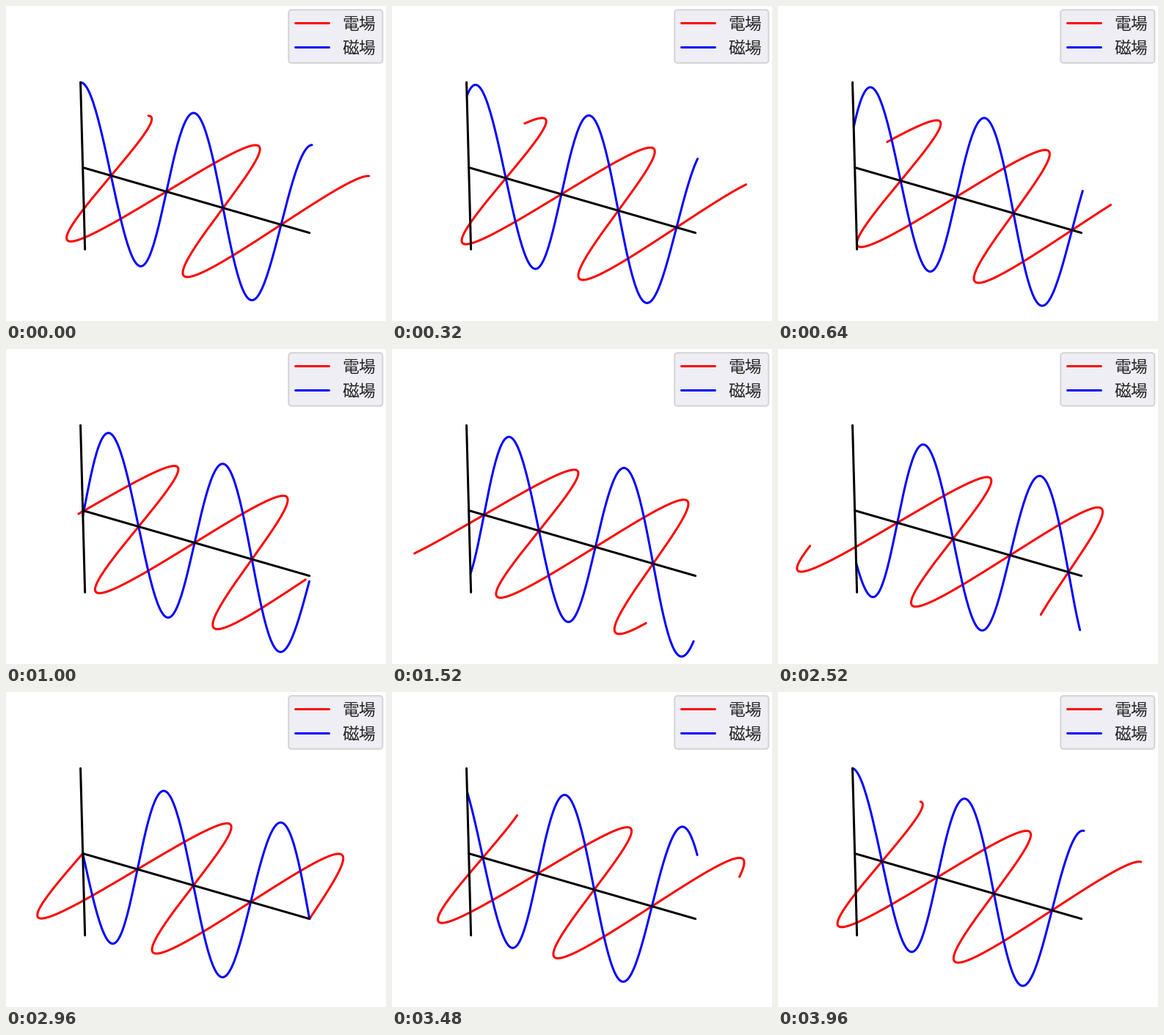
Write a matplotlib script that moves like this. It is 518 by 430 pixels and loops after 4 s.

```python
import numpy as np
import matplotlib.pyplot as plt
from matplotlib.animation import FuncAnimation
from matplotlib.patches import FancyBboxPatch

W, H, DPI = 518, 430, 128
FRAMES, INTERVAL = 100, 40
PX = 72 / DPI                       # points per pixel
LINE = 3.0 * PX
EM = 22.9                           # legend font size in pixels

# Perspective camera: elevation 30, azimuth -60, distance 10
CENTER, SCALE, DIST = (255.5, 264.0), 324.5, 10
HALF = np.array([0.5495, 0.5495, 0.4121])
EL, AZ = np.radians(30), np.radians(-60)
RIGHT = np.array([-np.sin(AZ), np.cos(AZ), 0])
UP = np.array([-np.sin(EL) * np.cos(AZ), -np.sin(EL) * np.sin(AZ), np.cos(EL)])
EYE = np.array([np.cos(EL) * np.cos(AZ), np.cos(EL) * np.sin(AZ), np.sin(EL)])


def project(x, y, z):
    """Map box coordinates in -1..1 to pixels, y pointing down."""
    p = np.stack(np.broadcast_arrays(x, y, z), axis=-1) * HALF
    depth = 1 - p @ EYE / DIST
    return (CENTER[0] + SCALE * (p @ RIGHT) / depth,
            CENTER[1] - SCALE * (p @ UP) / depth)


fig = plt.figure(figsize=(W / DPI, H / DPI), dpi=DPI, facecolor="white")
ax = fig.add_axes([0, 0, 1, 1])
ax.set_xlim(0, W)
ax.set_ylim(H, 0)
ax.axis("off")


def stroke(color, xs=(), ys=()):
    return ax.plot(xs, ys, color=color, lw=LINE, solid_capstyle="round")[0]


u = np.linspace(0, 1, 201)
along = 2 * u - 1
electric = stroke("red")
magnetic = stroke("blue")
ends = np.array([-1, 1])
stroke("black", *project(ends, 0, 0))
stroke("black", *project(-1, 0, ends))

ax.add_patch(FancyBboxPatch(
    (385.2, 5.2), 128.2, 72.6, boxstyle=f"round,pad=0,rounding_size={0.2 * EM}",
    facecolor="#EAEAF2", edgecolor="0.8", alpha=0.8, lw=2 * PX))
for color, label, y in (("red", "電場", 22.8), ("blue", "磁場", 56.0)):
    stroke(color, (394.3, 440.1), (y, y))
    ax.text(458.5, y + 8.6, label, color="0.15", fontsize=EM * PX,
            family="Noto Sans CJK JP", weight="light", va="baseline")


def update(i):
    wave = np.cos(4 * np.pi * u - 2 * np.pi * (i + 1) / FRAMES)
    electric.set_data(*project(along, wave, 0))
    magnetic.set_data(*project(along, 0, wave))
    return electric, magnetic


anim = FuncAnimation(fig, update, frames=FRAMES, interval=INTERVAL,
                     repeat=True, repeat_delay=0)
plt.show()
```
